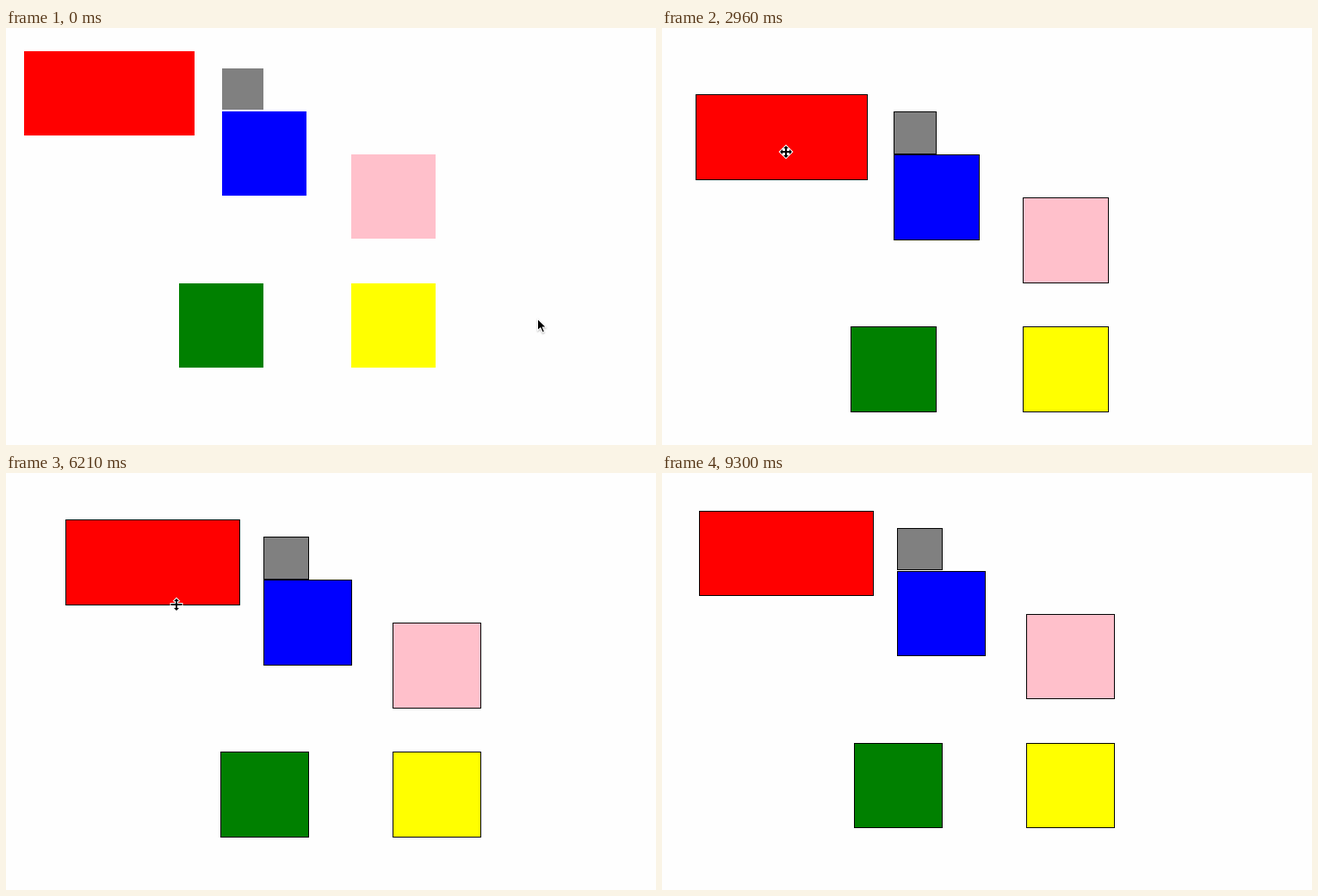
Recreate the animation shown at these times as an HTML page with a canvas. Size 755 by 485 pixels, loop 9.75 s.

```html
<!DOCTYPE html>
<html lang="en">
<head>
<meta charset="utf-8">
<title>Select, drag and resize</title>
<style>
  html, body { margin: 0; width: 100%; height: 100%; overflow: hidden; background: #fefefe; }
  canvas { display: block; }
</style>
</head>
<body>
<canvas id="stage" width="755" height="485"></canvas>
<script>
const ctx = document.getElementById('stage').getContext('2d');
const LOOP = 9750, STEP = 147.7, LAST = 63;
const { PI, sin, min, max, round, floor } = Math;

// x, y, width, height, colour
const boxes = [
  [20, 26, 200, 100, 'red'],
  [250, 46, 50, 50, 'gray'],
  [250, 96, 100, 100, 'blue'],
  [400, 146, 100, 100, 'pink'],
  [200, 296, 100, 100, 'green'],
  [400, 296, 100, 100, 'yellow']
];

const part = (s, a, b) => min(1, max(0, (s - a) / (b - a)));
const mix = (p, q, k) => p.map((v, i) => v + (q[i] - v) * k);
const add = (p, q) => p.map((v, i) => v + q[i]);
const smooth = k => k * k * (3 - 2 * k);
const easeOut = n => k => 1 - (1 - k) ** n;

// Pointer travel between two points over steps a..b, with an optional sideways bow
function glide(a, b, from, to, ease = k => k, bow = 0) {
  return s => {
    const k = part(s, a, b);
    return add(mix(from, to, ease(k)), [0, bow * sin(PI * k)]);
  };
}

// Drag of the whole group: pulled aside, then once around
function groupShift(s) {
  if (s <= 15) return mix([0, 0], [54, 6], smooth(part(s, 12, 15)));
  const k = part(s, 15, 22);
  const loop = [17 * sin(2 * PI * k) - 19 * sin(PI * k), 38 * sin(PI * k)];
  return add(mix([54, 6], [49, 28], k), loop);
}

// Right edge pulled in and back out
function widen(s) {
  const k = part(s, 28, 38);
  return 3 * k - 80 * sin(PI * k) ** 2.5;
}

// Bottom edge pulled up, then down, then back
function heighten(s) {
  const k = part(s, 42, 50), wave = sin(2 * PI * k);
  return 17.5 * wave * wave - 41.5 * wave - k;
}

// Second drag; the grabbed box overshoots at its beginning
const stops = [[0, 0], [-25, 1], [-26, -18], [-14, -16], [-20, -12], [-26, -10]];
function nudge(s) {
  const p = 5 * part(s, 53, 58), i = min(4, floor(p));
  return mix(stops[i], stops[i + 1], p - i);
}
function grabbedNudge(s) {
  const kick = sin(PI * part(s, 53, 55));
  return add(nudge(s), [-27 * kick, -17 * kick]);
}

// Pointer gestures, each lasting up to a step
const gestures = [
  { until: 2, mark: arrow, at: glide(0, 2, [617, 337], [641, 374]) },
  { until: 7, mark: arrow, at: glide(2, 7, [641, 374], [249, 132], smooth) },
  { until: 11, mark: arrow, at: glide(7, 12, [249, 132], [125, 93], easeOut(2)) },
  { until: 22, mark: moveMark, at: s => add([125, 93], groupShift(s)) },
  { until: 26, mark: moveMark, at: glide(22, 27, [174, 121], [268, 143], k => k, 22) },
  { until: 38, mark: sideMark, at: s => [268 + (s > 28 ? widen(s + .7) : 0), 143] },
  { until: 41, mark: arrow, at: glide(38, 42, [271, 143], [198, 153], k => k, 8) },
  { until: 50, mark: upDownMark, at: s => [198, 153 + heighten(s)] },
  { until: 51, mark: arrow, at: glide(50, 52, [198, 152], [346, 173]) },
  { until: 58, mark: moveMark, at: s => add([346, 173], grabbedNudge(s)) },
  { until: 62, mark: arrow, at: glide(58, 62, [320, 163], [695, 470], easeOut(3)) }
];
const gestureAt = s => gestures.find(g => s <= g.until);

function poly(points, color) {
  ctx.beginPath();
  points.forEach(([x, y]) => ctx.lineTo(x, y));
  ctx.closePath();
  ctx.fillStyle = color;
  ctx.fill();
}

function arrow() {
  ctx.shadowColor = 'rgba(0,0,0,.3)';
  ctx.shadowBlur = 2;
  ctx.shadowOffsetY = 1;
  poly([[0, 0], [0, 16], [3.7, 12.8], [6, 18], [9, 16.8], [6.9, 11.6], [11.5, 11.5]], '#fff');
  ctx.shadowColor = 'transparent';
  poly([[1, 2.4], [1, 13.6], [4, 10.9], [6.5, 16.5], [7.8, 15.9], [5.5, 10.5], [9.2, 10.5]], '#000');
}

function head(angle) {
  ctx.save();
  ctx.rotate(angle);
  poly([[7, 0], [4, -3], [4, -1], [0, -1], [0, 1], [4, 1], [4, 3]], '#000');
  ctx.restore();
}

function moveMark() {
  poly([[-8.5, 0], [0, -8.5], [8.5, 0], [0, 8.5]], '#fff');
  for (let i = 0; i < 4; i++) head(i * PI / 2);
}

function sideMark() {
  const bar = (w, h, color) => {
    ctx.fillStyle = color;
    ctx.fillRect(-w / 2, -h / 2, w, h);
  };
  poly([[-8.5, 0], [-4, -4.5], [-3, -2], [3, -2], [4, -4.5],
    [8.5, 0], [4, 4.5], [3, 2], [-3, 2], [-4, 4.5]], '#fff');
  bar(4, 15, '#fff');
  head(0);
  head(PI);
  bar(2, 13, '#000');
}

function upDownMark() {
  ctx.rotate(PI / 2);
  sideMark();
}

function drawBox([x, y, w, h, color], s) {
  const move = color === 'blue' ? grabbedNudge(s) : nudge(s);
  [x, y] = add([x, y], add(groupShift(s), move)).map(round);
  // The box under the pointer resizes first, the rest one step later
  w = max(2, round(w + widen(color === 'red' ? s : s - 1)));
  h = max(2, round(h + heighten(s)));
  if (s >= 10) {
    ctx.fillStyle = '#000';
    ctx.fillRect(x, y, w, h);
  }
  ctx.fillStyle = color;
  ctx.fillRect(x + 1, y + 1, w - 2, h - 2);
}

function drawMarquee(s) {
  if (s < 4 || s > 9) return;
  const [x, y] = add(gestureAt(s).at(s), [20, 11]).map(round);
  const w = 642 - x, h = 375 - y;
  ctx.fillStyle = 'rgba(82,175,255,.54)';
  ctx.fillRect(x, y, w, h);
  ctx.strokeStyle = '#4af';
  ctx.lineWidth = 1;
  ctx.strokeRect(x + .5, y + .5, w - 1, h - 1);
}

function drawPointer(s) {
  const gesture = gestureAt(s);
  if (!gesture) return;
  ctx.save();
  ctx.translate(...gesture.at(s).map(round));
  gesture.mark();
  ctx.restore();
}

function draw(now) {
  const s = min(LAST, floor((now % LOOP + 12) / STEP));
  ctx.fillStyle = '#fefefe';
  ctx.fillRect(0, 0, 755, 485);
  boxes.forEach(b => drawBox(b, s));
  drawMarquee(s);
  drawPointer(s);
}

let start;
function tick(now) {
  if (start === undefined) start = now;
  draw(max(0, now - start));
  requestAnimationFrame(tick);
}
draw(0);
requestAnimationFrame(tick);
</script>
</body>
</html>
```
